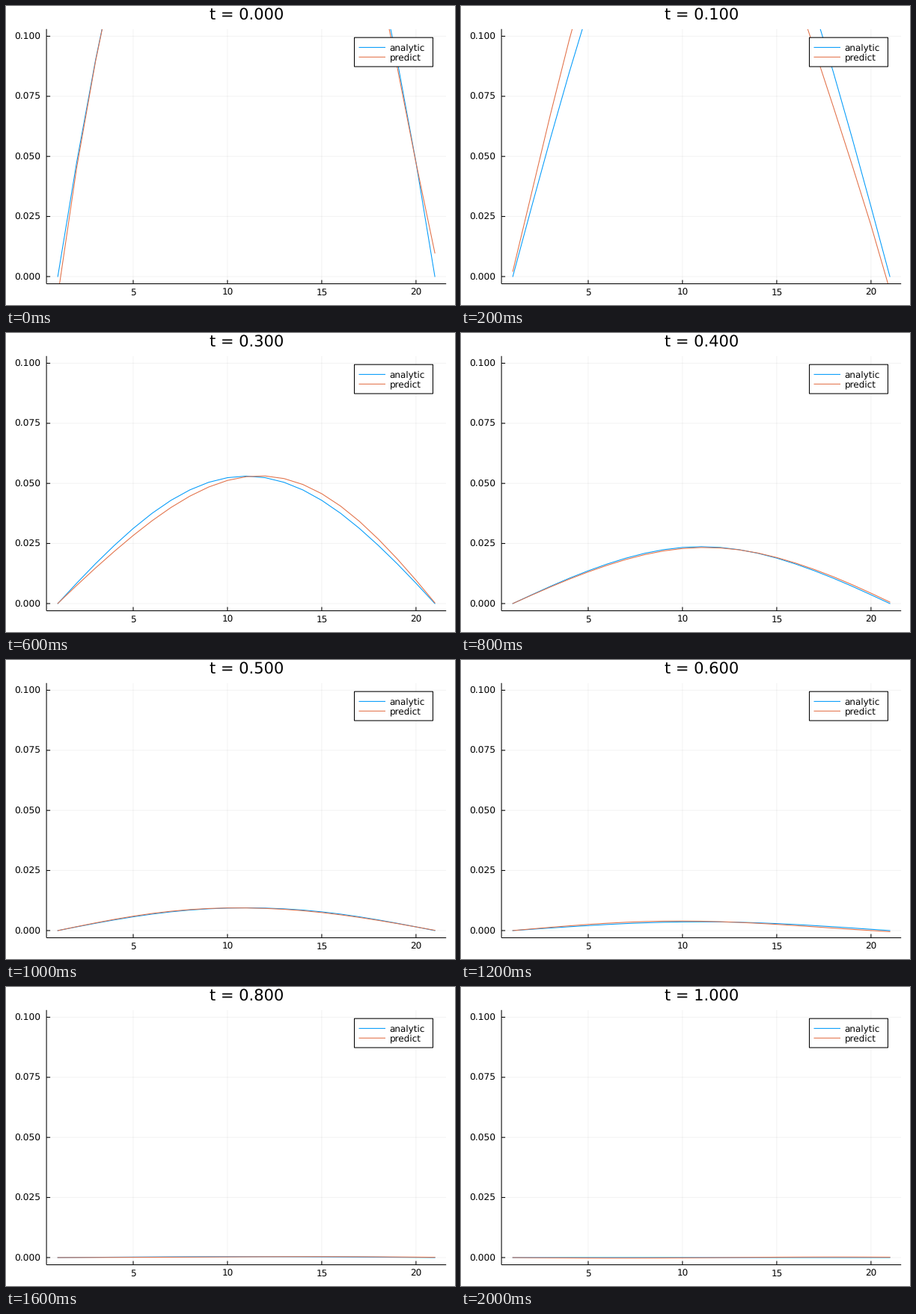
Animation of 600x400 px, one loop 2.1 s. Source, as a matplotlib script:

```python
import numpy as np
import matplotlib.pyplot as plt
from matplotlib.animation import FuncAnimation
from matplotlib.patches import Rectangle

W, H, DPI = 600, 400, 100
PX = 72 / DPI
BLUE, ORANGE = "#009afa", "#e26f46"
LEFT, RIGHT, TOP, BOTTOM = 54.1, 588.2, 30.8, 371.6
XLIM, YLIM = (0.4, 21.6), (-0.003, 0.103)

plt.rcParams.update({
    "font.family": "DejaVu Sans",
    "text.hinting": "none",
    "path.snap": False,
})

# Damped wave u_xx = u_tt / V^2 + B u_t, u(0, x) = x (1 - x), u_t(0, x) = 1 - 2x
V, B = 3, 2
DECAY = V**2 * B / 2
idx = np.arange(1, 22)
x = (idx - 1) / 20


def mu(k):
    return V / 2 * np.sqrt(4 * (k * np.pi) ** 2 - (B * V) ** 2)


def analytic(t):
    """Modes excited by the initial shape."""
    k = np.arange(1, 50, 2)[:, None]
    m = mu(k)
    amp = 8 / (k * np.pi) ** 3 * (np.cos(m * t) + DECAY / m * np.sin(m * t))
    return np.exp(-DECAY * t) * (amp * np.sin(k * np.pi * x)).sum(0)


def velocity_mode(t):
    """Leading mode excited by the initial velocity."""
    m = mu(2)
    return 2 / np.pi / m * np.exp(-DECAY * t) * np.sin(m * t) * np.sin(2 * np.pi * x)


def network_error(t):
    """Ringing at both ends, an early sag and a slow swell, in thousandths."""
    ring = np.exp(-12 * t) * np.cos(27 * t)
    ends = ring * (15 * x**24 - 8 * (1 - x) ** 24)
    sag = -5 * np.exp(-20 * t) * x**3
    phase = 2 * np.pi * (t - 0.38) / 0.53
    swell = -1.5 * np.exp(-1.2 * t) * np.cos(phase) * np.sin(5.5 * x)
    return (ends + sag + swell) / 1000


def predict(t):
    return analytic(t) + velocity_mode(t) + network_error(t)


fig = plt.figure(figsize=(W / DPI, H / DPI), dpi=DPI, facecolor="white")

ax = fig.add_axes([LEFT / W, 1 - BOTTOM / H, (RIGHT - LEFT) / W, (BOTTOM - TOP) / H])
ax.set(xlim=XLIM, ylim=YLIM)
ax.axis("off")

# Overlay in pixel coordinates, y pointing down
page = fig.add_axes([0, 0, 1, 1], zorder=2)
page.set(xlim=(0, W), ylim=(H, 0))
page.axis("off")


def stroke(xs, ys, color="black"):
    page.plot(xs, ys, color=color, lw=1.05 * PX, solid_capstyle="butt")


def label(px, py, text, size=12, ha="center"):
    return page.text(px, py, text, fontsize=size * PX, ha=ha, va="baseline")


def to_px(v, lim, start, end):
    return start + (v - lim[0]) / (lim[1] - lim[0]) * (end - start)


GRID = dict(color="black", lw=PX, alpha=0.05, zorder=0)
for v in np.arange(5, 21, 5):
    px = to_px(v, XLIM, LEFT, RIGHT)
    ax.axvline(v, **GRID)
    stroke([px, px], [BOTTOM, BOTTOM - 5])
    label(px, 387.3, str(v))
for v in np.arange(5) * 0.025:
    py = to_px(v, YLIM, BOTTOM, TOP)
    ax.axhline(v, **GRID)
    stroke([LEFT, LEFT + 5], [py, py])
    label(46.2, py + 4.4, f"{v:.3f}", size=12.2, ha="right")
stroke([LEFT, RIGHT], [BOTTOM, BOTTOM])
stroke([LEFT, LEFT], [BOTTOM, TOP])

page.add_patch(Rectangle((465.5, 42.2), 105, 38.9, fc="white", ec="black", lw=1.05 * PX))
for py, name, color in ((55.4, "analytic", BLUE), (68.3, "predict", ORANGE)):
    stroke([471.5, 507], [py, py], color)
    label(512.5, py + 4.4, name, ha="left")

title = label((LEFT + RIGHT) / 2, 18, "", size=21)
exact, = ax.plot([], [], color=BLUE, lw=1.05 * PX)
guess, = ax.plot([], [], color=ORANGE, lw=1.05 * PX)


def update(i):
    t = i / 20
    title.set_text(f"t = {t:.3f}")
    exact.set_data(idx, analytic(t))
    guess.set_data(idx, predict(t))
    return title, exact, guess


anim = FuncAnimation(fig, update, frames=21, interval=100, repeat=True, repeat_delay=0)
plt.show()
```
